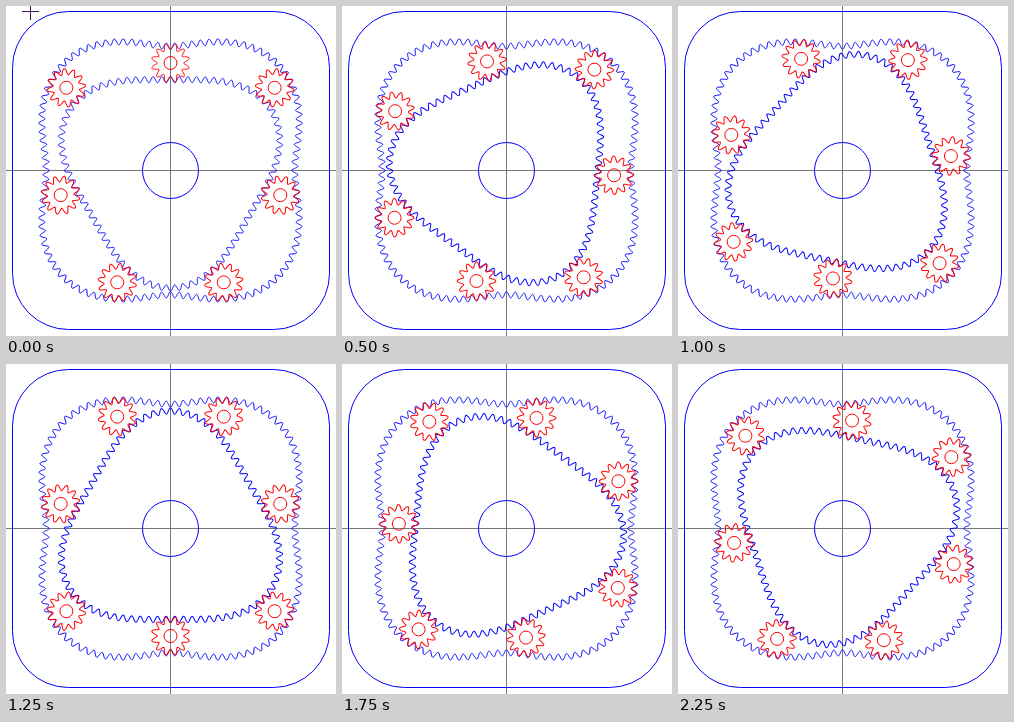
Animation, 330 px wide and 330 px high, one loop 2500 ms. Source, as an HTML page:

```html
<!DOCTYPE html>
<html lang="en">
<head>
<meta charset="utf-8">
<title>Planetary gear with lobed wheels</title>
<style>
  html, body { margin: 0; width: 100%; height: 100%; overflow: hidden; background: #fff; }
  svg { display: block; width: 100vw; height: 100vh; }
  svg * { fill: none; stroke-width: 1; }
  .blue { stroke: #00f; }
  .red { stroke: #f00; }
  .axis { stroke: #777; }
  .mark { stroke: #3c1450; animation: mark 2500ms step-end infinite; }
  @keyframes mark { 0% { visibility: visible; } 10%, 100% { visibility: hidden; } }
</style>
</head>
<body>
<svg viewBox="0 0 330 330">
  <path class="axis" d="M0 164.5H330M164.5 0V330"/>
  <path class="mark" d="M16 5.5H33M24.5 0V14"/>
  <rect class="blue" x="6.5" y="5.5" width="317" height="318" rx="56"/>
  <g id="stage" transform="translate(164.5 164.5)">
    <circle class="blue" r="28"/>
  </g>
</svg>
<script>
const TAU = 2 * Math.PI, DEG = 180 / Math.PI;
const PERIOD = 2500, STEPS = 10;
const MEAN = 120.9, LOBE = 13.4, SKEW = 0.0045;  // path of the planet centres
const TEETH = 12, PER_LOBE = 26, PITCH = 16.5;
const HEIGHT = 3.05, GAP = 0.25;
const SAMPLES = 2496;
const stage = document.getElementById("stage");

function add(parent, tag, attrs) {
  const el = document.createElementNS("http://www.w3.org/2000/svg", tag);
  for (const key in attrs) el.setAttribute(key, attrs[key]);
  return parent.appendChild(el);
}

// Angles run clockwise from the top.
const polar = (r, a) => [r * Math.sin(a), -r * Math.cos(a)];
const outline = pts => "M" + pts.map(p => p[0].toFixed(2) + " " + p[1].toFixed(2)).join("L") + "Z";

function centre(u, lobes, skew) {
  return polar(MEAN - LOBE * Math.cos(u), u / lobes + skew * Math.sin(u));
}

function normal(u, lobes, skew) {
  const a = centre(u - 0.001, lobes, skew), b = centre(u + 0.001, lobes, skew);
  return Math.atan2(b[1] - a[1], b[0] - a[0]);
}

// Pitch curve offset from the centre path, with tooth phase by arc length.
function wheel(lobes, skew, side) {
  const pts = [], phase = [0];
  for (let i = 0; i <= SAMPLES; i++) {
    const u = i / SAMPLES * TAU * lobes;
    const c = centre(u, lobes, skew), a = normal(u, lobes, skew);
    const d = polar(side * PITCH, a);
    pts.push({ x: c[0] + d[0], y: c[1] + d[1], a });
    if (i) phase.push(phase[i - 1] + Math.hypot(pts[i].x - pts[i - 1].x, pts[i].y - pts[i - 1].y));
  }
  const scale = TAU * PER_LOBE * lobes / phase[SAMPLES];
  phase.forEach((s, i) => phase[i] = s * scale);
  const path = outline(pts.slice(0, -1).map((p, i) => {
    const d = polar(side * (GAP - HEIGHT * Math.cos(phase[i])), p.a);
    return [p.x + d[0], p.y + d[1]];
  }));
  return { path, phase };
}

const ring = wheel(4, -SKEW, 1);
const inner = wheel(3, SKEW, -1);
add(stage, "path", { class: "blue", d: ring.path });
const rotor = add(stage, "path", { class: "blue", d: inner.path });

const star = outline(Array.from({ length: 240 }, (_, i) => {
  const a = i / 240 * TAU;
  return polar(PITCH - GAP - HEIGHT * Math.cos(TEETH * a), a);
}));
const planets = Array.from({ length: 7 }, () => {
  const g = add(stage, "g", { class: "red" });
  add(g, "circle", { r: 6.5 });
  return { g, gear: add(g, "path", { d: star }) };
});

function phaseAt(turn) {
  const f = turn * SAMPLES, i = Math.floor(f) % SAMPLES;
  return ring.phase[i] + (ring.phase[i + 1] - ring.phase[i]) * (f - Math.floor(f));
}

function pose(step) {
  const part = step / STEPS;
  rotor.setAttribute("transform", `rotate(${-120 * part})`);
  planets.forEach(({ g, gear }, i) => {
    const turn = ((i - part) / 7 + 1) % 1, u = 4 * TAU * turn;
    const c = centre(u, 4, -SKEW);
    const spin = normal(u, 4, -SKEW) - phaseAt(turn) / TEETH;
    g.setAttribute("transform", `translate(${c[0].toFixed(3)} ${c[1].toFixed(3)})`);
    gear.setAttribute("transform", `rotate(${(spin * DEG).toFixed(3)})`);
  });
}

let shown = -1;
function tick() {
  const step = Math.floor(performance.now() % PERIOD / PERIOD * STEPS);
  if (step !== shown) pose(shown = step);
  requestAnimationFrame(tick);
}
pose(0);
tick();
</script>
</body>
</html>
```
